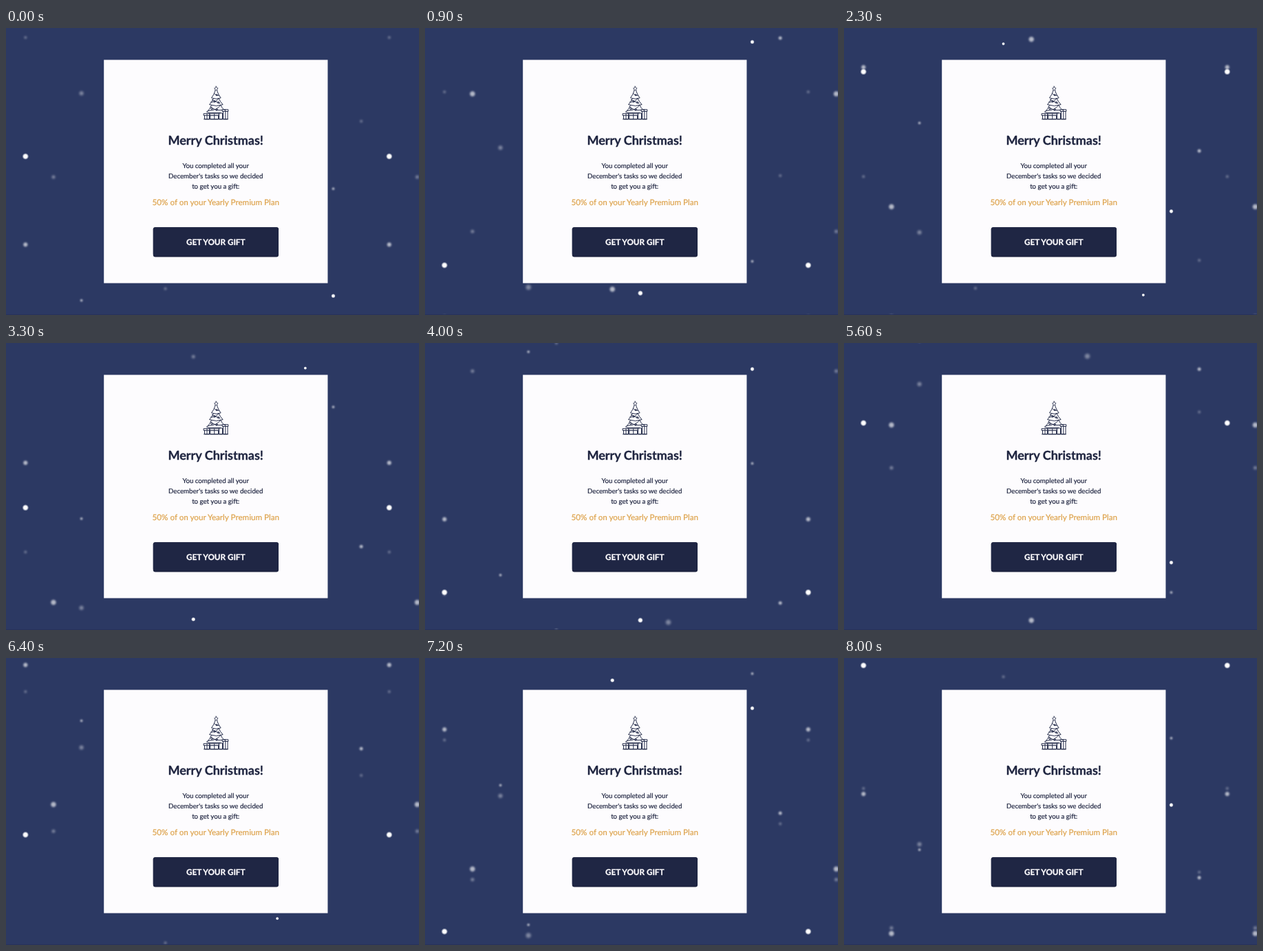
Animation of 600 by 418 pixels, one loop 8.1 s. Source, as an HTML page with a canvas:

```html
<!DOCTYPE html>
<html lang="en">
<head>
<meta charset="utf-8">
<title>Merry Christmas</title>
<style>
  html, body { margin: 0; width: 100%; height: 100%; overflow: hidden; background: #2c3963; }
  canvas, svg { position: absolute; left: 0; top: 0; display: block; }
  text {
    font-family: Lato, sans-serif; text-anchor: middle; text-rendering: geometricPrecision;
    fill: currentColor; stroke: currentColor; stroke-width: .2px; color: #1f2540;
  }
  .bold { font-weight: 700; stroke-width: .3px; }
</style>
</head>
<body>
<canvas id="snow" width="600" height="418"></canvas>
<svg width="600" height="418" viewBox="0 0 600 418">
  <rect x="142.2" y="46.4" width="325.2" height="325.2" fill="#fdfcfe"/>

  <g fill="none" stroke="#262e4c" stroke-linejoin="round" stroke-linecap="round">
    <path d="M305.300 85l1 2.200 1.700.5-1.300 1.400.3 1.900-1.700-.8-1.700.8.3-1.900-1.300-1.400 1.700-.5z" stroke-width=".8"/>
    <path d="M304 91.500q-2 6-5.500 10.300l3 .7q-2 5-6 9l3.300.8q-2.500 6-7.300 10l4 1.200M306.600 91.500q2 6 5.500 10.300l-3 .7q2 5 6 9l-3.300.8q2 4.500 5.700 7.500"/>
    <path d="M301.500 102.500q4 1.500 7.600 0M298.800 112.300q7 2.300 13 0M295.500 123.500h16.500"/>
    <path d="M302.500 95.500q3 4 7 2.800M299.500 104.500l11.500 5.500M309 102.500q-4 6-11.500 5.500M297 114.500q6 6.500 17 5M311.800 112.300q-5 8-18.300 8.200"/>
    <circle cx="306" cy="97.500" r="1"/><circle cx="303" cy="107" r="1.200"/>
    <circle cx="308.500" cy="108.500" r="1.200"/><circle cx="299" cy="117.500" r="1.300"/>
    <circle cx="306" cy="119" r="1.300"/>
    <path d="M288.500 127.300v5.500h7V127.300M287.500 124.700h8.500v2.600h-8.500zM292 124.700v8"/>
    <path d="M297 127.500h11.500v5.300H297zM296.200 125h13v2.500h-13zM302.700 125v7.800"/>
    <path d="M310 124h4.500v8.800H310zM315.500 121.500v11.300h6.500v-11.300M314.500 118.800h8.300v2.700h-8.300zM318.700 118.800v14M287.500 132.800h35"/>
  </g>

  <text class="bold" x="304.700" y="169.800" font-size="18">Merry Christmas!</text>
  <g font-size="9.700">
    <text x="304.700" y="204.200">You completed all your</text>
    <text x="304.700" y="218.800">December's tasks so we decided</text>
    <text x="304.700" y="233.500">to get you a gift:</text>
  </g>
  <text x="304.800" y="258.400" font-size="11.650" style="color:#dda24a">50% of on your Yearly Premium Plan</text>

  <rect x="213.800" y="290.300" width="182.200" height="43.200" rx="3" fill="#1b213d"/>
  <rect x="213.800" y="290.300" width="182.200" height="41.500" rx="3" fill="#1f2644"/>
  <text class="bold" x="304.800" y="316.200" font-size="11.700" style="color:#fdfcfe">GET YOUR GIFT</text>
</svg>
<script>
  const ctx = document.getElementById('snow').getContext('2d');
  const W = 600, H = 418;
  const LOOP = 8100, STEP = 100;
  const SCALE = 0.813, TILE = 650 * SCALE, GAP = 50 * SCALE, LEFT = 28.3;
  const SPEED = TILE / 3000;

  // column, y, radius inside the repeating tile
  const flakes = [
    [4, 330, 3], [5, 180, 3], [6, 430, 4], [7, 280, 5], [8, 530, 6],
    [9, 380, 3], [10, 630, 3], [11, 480, 4], [0, 230, 6]
  ];
  const layers = [
    { shift: 0, dy: 0, rate: 1, alpha: 1, blur: 0 },
    { shift: 6, dy: 108, rate: 2 / 3, alpha: 0.65, blur: 1 },
    { shift: 8, dy: -163, rate: 1 / 2, alpha: 0.4, blur: 1.8 }
  ];

  const mod = (a, n) => ((a % n) + n) % n;

  function dot(x, y, r) {
    if (x > W + 12 || y > H + 12 || y < -12) return;
    const g = ctx.createRadialGradient(x, y, 0, x, y, r);
    g.addColorStop(0.5, '#fff');
    g.addColorStop(1, 'rgba(255,255,255,0)');
    ctx.fillStyle = g;
    ctx.beginPath();
    ctx.arc(x, y, r, 0, Math.PI * 2);
    ctx.fill();
  }

  function draw(t) {
    ctx.fillStyle = '#2c3963';
    ctx.fillRect(0, 0, W, H);
    for (const { shift, dy, rate, alpha, blur } of layers) {
      ctx.globalAlpha = alpha;
      ctx.filter = blur ? `blur(${blur}px)` : 'none';
      for (const [col, y0, r] of flakes) {
        const x = LEFT + mod(col + shift, 13) * GAP;
        const y = mod((y0 + dy) * SCALE + SPEED * rate * t, TILE);
        for (const px of [x, x + TILE])
          for (const py of [y, y - TILE]) dot(px, py, r * SCALE);
      }
    }
    ctx.globalAlpha = 1;
    ctx.filter = 'none';
    ctx.fillStyle = '#27325a';
    ctx.fillRect(0, H - 1, W, 1);
  }

  const start = performance.now();
  let last = -1;
  function tick() {
    const t = Math.floor(((performance.now() - start) % LOOP) / STEP) * STEP;
    if (t !== last) draw(last = t);
    requestAnimationFrame(tick);
  }
  tick();
</script>
</body>
</html>
```
